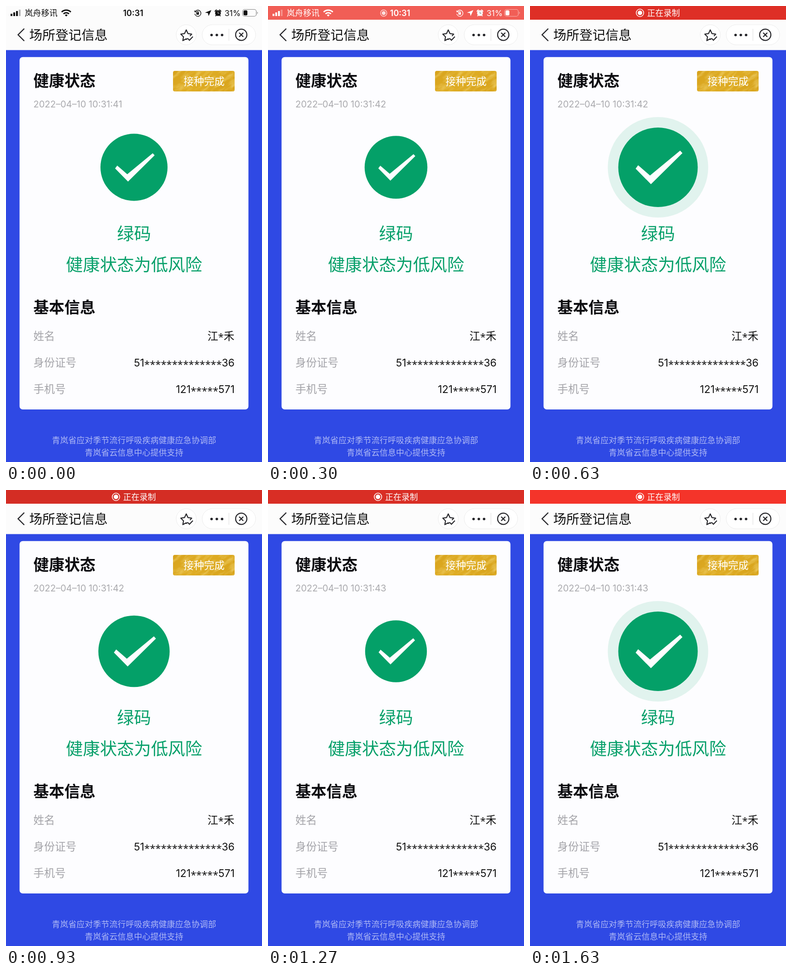
Animation, 561 px wide and 998 px high, one loop 1.66 s. Source, as an HTML page:

```html
<!DOCTYPE html>
<html lang="zh-CN">
<head>
<meta charset="utf-8">
<title>场所登记信息</title>
<style>
  html, body { margin: 0; width: 100%; height: 100%; overflow: hidden; background: #2f49e4; }
  svg { display: block; width: 100%; height: 100%; }
  text { font-family: "Noto Sans CJK SC", "Noto Sans CJK", sans-serif; white-space: pre; }
  .num { font-family: Inter, sans-serif; }
  .stars { font-family: "Noto Sans", sans-serif; font-size: 22px; }
  .line { fill: none; stroke: currentColor; }
  .heading { font-size: 34px; font-weight: 700; fill: #0b0b0f; }
  .result { font-size: 37.3px; fill: #07a06a; text-anchor: middle; }
  .label { font-size: 23.6px; fill: #a3a3a8; }
  .value { font-size: 23.5px; fill: #111; text-anchor: end; }
  .value.num { font-size: 22.8px; }
  .foot { font-size: 18px; fill: #aeb8f5; text-anchor: middle; }
  .bar { font-size: 18px; fill: currentColor; }
</style>
</head>
<body>
<svg viewBox="0 0 561 998" preserveAspectRatio="none">
  <defs>
    <linearGradient id="gold" x2="1" y2=".35">
      <stop offset="0" stop-color="#d7a21c"/>
      <stop offset=".5" stop-color="#dfad25"/>
      <stop offset="1" stop-color="#d9a51d"/>
    </linearGradient>
    <filter id="grain" x="0" y="0" width="1" height="1">
      <feTurbulence type="fractalNoise" baseFrequency=".04 .14" numOctaves="3" seed="4"/>
      <feColorMatrix values="0 0 0 0 1  0 0 0 0 .85  0 0 0 0 .35  1.6 0 0 0 -.65"/>
    </filter>
    <clipPath id="tag"><rect x="366" y="142" width="135" height="45" rx="4"/></clipPath>
    <g id="status">
      <path fill="currentColor" d="M10 17h4v5h-4zM16 14h4v8h-4zM22 11h4v11h-4z"/>
      <path fill="currentColor" opacity=".3" d="M28 8h4v14h-4z"/>
      <text class="bar" x="41" y="22">岚舟移讯</text>
      <path class="line" stroke-width="3" d="M122 13.2a14 14 0 0 1 20 0M126 17.2a8.5 8.5 0 0 1 12 0"/>
      <path fill="currentColor" d="M132 23l-3-3a4.3 4.3 0 0 1 6 0z"/>
      <path class="line" stroke-width="1.4" d="M414.6 12.2a6.8 6.8 0 1 1-.9 5M413 10l1.3 3.2 3.3-1M418.2 15v-1.2a1.8 1.8 0 0 1 3.6 0V15"/>
      <path fill="currentColor" d="M417.2 14.6h5.6v4.4h-5.6zM450 9l-6 13-1.5-6.5-6.5-1z"/>
      <circle cx="464.5" cy="15.5" r="6.3" fill="currentColor"/>
      <path class="line" stroke-width="2" stroke-linecap="round" d="M458 11.5l3-3M471 11.5l-3-3M460.5 20.5l-1 1M468.5 20.5l1 1"/>
      <path fill="none" stroke="#999" stroke-width="1.3" d="M464.5 12v4h3"/>
      <text class="bar num" x="479" y="22" style="font-size:17.5px">31%</text>
      <rect class="line" x="518.5" y="7.5" width="30" height="15" rx="4.5" stroke-width="1.2" opacity=".5"/>
      <path fill="currentColor" opacity=".5" d="M550.5 12.5q3 2.5 0 5z"/>
      <rect x="520.5" y="9.5" width="8.5" height="11" rx="2.5" fill="currentColor"/>
    </g>
    <text id="time" class="bar num" x="256.5" y="21.5" font-weight="600">10:31</text>
    <g id="record">
      <circle class="line" r="8.2" stroke-width="1.6"/>
      <circle r="5" fill="currentColor"/>
    </g>
  </defs>

  <rect width="561" height="998" fill="#2f49e4"/>
  <rect width="561" height="96.5" fill="#fcfcfc"/>

  <g id="dark" color="#111"><use href="#status"/><use href="#time" class="clock"/></g>
  <g id="red"><rect width="561" height="30" fill="#f4342a"/><rect id="shade" width="561" height="30"/></g>
  <g id="light" color="#fff">
    <use href="#status"/>
    <use href="#time" class="clock"/>
    <use id="dot" href="#record" transform="translate(253.5 15.5) scale(.85)"/>
  </g>
  <g id="recording" color="#fff">
    <use href="#record" x="241" y="15"/>
    <text class="bar" x="256.5" y="22">正在录制</text>
  </g>

  <g color="#26262a">
    <path class="line" stroke-width="2.4" d="M40 49.5L26.5 63 40 76.5"/>
    <text x="51" y="73.5" font-size="28.6" font-weight="500" fill="#111">场所登记信息</text>
    <g fill="#fff" stroke="#ececec">
      <circle cx="395" cy="63" r="22"/>
      <rect x="430" y="41" width="117" height="44" rx="22"/>
      <path d="M488.5 50v26" stroke="#ddd"/>
    </g>
    <path class="line" stroke-width="2.2" stroke-linejoin="round" d="M397 73l-2-1.2-7.5 4 1.5-8.3-6-6 8.3-1.2 3.7-8 3.7 8 8.3 1.2-4 4.3M397.5 70.5l4.5 4.5 7.5-8"/>
    <g fill="currentColor"><circle cx="450.5" cy="63.5" r="2.8"/><circle cx="462" cy="63.5" r="2.8"/><circle cx="473.5" cy="63.5" r="2.8"/></g>
    <circle class="line" cx="515.5" cy="63" r="12.3" stroke-width="2.3"/>
    <path class="line" stroke-width="2.4" d="M511 58.5l9 9M520 58.5l-9 9"/>
  </g>

  <rect x="29.7" y="111.7" width="501.6" height="771.3" rx="7" fill="#fdfdff"/>
  <text class="heading" x="60" y="176">健康状态</text>
  <g clip-path="url(#tag)">
    <rect x="366" y="142" width="135" height="45" fill="url(#gold)"/>
    <rect x="353" y="90" width="160" height="150" transform="rotate(-35 433 165)" filter="url(#grain)" opacity=".6"/>
  </g>
  <text x="389" y="173" font-size="22.5" font-weight="500" fill="#fff">接种完成</text>
  <text id="stamp" class="num" x="60" y="221.5" font-size="20" fill="#aaaaae"></text>

  <g transform="translate(280.5 353)" fill="#04a068">
    <circle id="ring"/>
    <g id="badge">
      <circle r="87"/>
      <path fill="#fdfdff" d="M-43.5-4.5L-17.5 18 48.5-36.5 53.5-31-15.5 37-49 3z"/>
    </g>
  </g>

  <text class="result" x="280.5" y="512">绿码</text>
  <text class="result" x="280.5" y="580">健康状态为低风险</text>

  <text class="heading" x="60" y="672">基本信息</text>
  <text class="label" x="60" y="731">姓名</text>
  <text class="label" x="60" y="789">身份证号</text>
  <text class="label" x="60" y="847">手机号</text>
  <text class="value" x="500.5" y="731">江<tspan class="stars" dy="1">*</tspan><tspan dy="-1">禾</tspan></text>
  <text class="value num" x="501" y="788.5">51<tspan class="stars" dy="3">**************</tspan><tspan dy="-3">36</tspan></text>
  <text class="value num" x="501" y="846.5">121<tspan class="stars" dy="3">*****</tspan><tspan dy="-3">571</tspan></text>

  <text class="foot" x="280.5" y="957">青岚省应对季节流行呼吸疾病健康应急协调部</text>
  <text class="foot" x="280.5" y="984">青岚省云信息中心提供支持</text>
</svg>
<script>
const LOOP = 1660, BEAT = 1000;
const el = id => document.getElementById(id);
const clocks = document.querySelectorAll('.clock');
const clamp = x => Math.min(1, Math.max(0, x));
const ease = x => 0.5 - 0.5 * Math.cos(Math.PI * clamp(x));
const fade = (id, value) => el(id).setAttribute('opacity', value);

// Linear interpolation through [time, value] points.
function track(points, t) {
  const i = points.findIndex(p => p[0] > t);
  if (i < 0) return points[points.length - 1][1];
  if (i === 0) return points[0][1];
  const [t0, a] = points[i - 1], [t1, b] = points[i];
  return a + (b - a) * (t - t0) / (t1 - t0);
}

function drawStatus(t) {
  const swap = clamp((t - 460) / 130);
  fade('red', track([[60, 0], [170, .23], [350, 1]], t));
  fade('shade', track([[200, 0], [430, .05], [630, .09], [930, .135], [1270, .11], [1630, 0]], t));
  fade('dark', track([[40, 1], [140, .08], [210, 0]], t));
  fade('light', track([[40, 0], [140, .75], [300, 1]], t) * (1 - swap));
  fade('dot', track([[180, 0], [330, 1]], t));
  fade('recording', swap);
  const shift = 11 * ease((t - 60) / 260);
  clocks.forEach(c => c.setAttribute('x', shift));
}

function drawPulse(t) {
  const phase = (t + BEAT - 194) % BEAT;
  const radius = 66.5 + 21.4 * ease(1 - Math.abs(phase / 500 - 1));
  const spread = ease((phase - 56) / 485);
  el('badge').setAttribute('transform', `scale(${radius / 87})`);
  el('ring').setAttribute('r', 66.5 + 49 * spread);
  fade('ring', 1 - spread);
}

let start;
function frame(now) {
  start ??= now;
  const t = (now - start) % LOOP;
  drawStatus(t);
  drawPulse(t);
  el('stamp').textContent = `2022–04–10 10:31:${41 + (t >= 100) + (t >= 1100)}`;
  requestAnimationFrame(frame);
}
requestAnimationFrame(frame);
</script>
</body>
</html>
```
